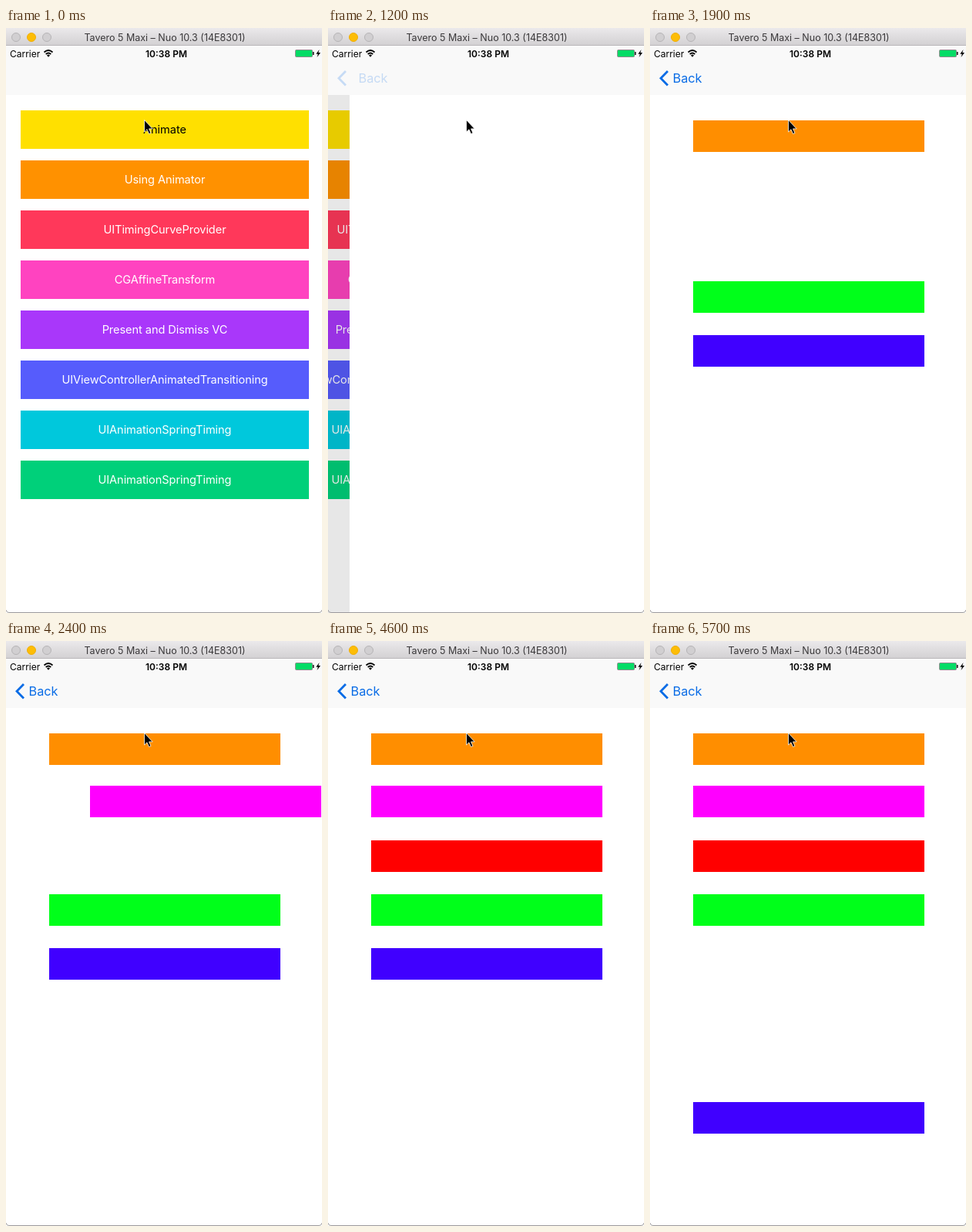
An HTML page that plays this animation: 410 by 760 pixels, repeating every 5800 ms.

```html
<!DOCTYPE html>
<html lang="en">
<head>
<meta charset="utf-8">
<style>
html, body { margin: 0; width: 100%; height: 100%; overflow: hidden; background: #fff; }
svg { display: block; width: 410px; height: 760px; font-family: Inter, Roboto, sans-serif; }
#buttons text { font-size: 14.6px; letter-spacing: -.08px; text-anchor: middle; }
</style>
</head>
<body>
<svg viewBox="0 0 410 760">
  <defs>
    <linearGradient id="chrome" x2="0" y2="1">
      <stop stop-color="#ebe9eb"/><stop offset="1" stop-color="#d2d0d2"/>
    </linearGradient>
  </defs>
  <rect width="410" height="760" fill="#fff"/>
  <g id="menu">
    <g id="buttons"></g>
  </g>
  <rect id="dim" y="87" width="410" height="673"/>
  <g id="page">
    <rect y="87" width="410" height="673" fill="#fff"/>
    <g id="bars"></g>
  </g>

  <rect y="23" width="410" height="64" fill="#f9f9f9"/>
  <path id="chevron" d="M23 56 L14 65.2 L23 74.5" fill="none" stroke="#0a6ce6" stroke-width="2.8"/>
  <text id="back" x="29.5" y="71" font-size="16.3" fill="#0a6ce6">Back</text>

  <text x="5" y="38" font-size="12">Carrier</text>
  <g fill="none" stroke="#000" stroke-width="1.7">
    <path d="M49.5 31.5 Q55 26.5 60.5 31.5"/>
    <path d="M51.7 34 Q55 31 58.3 34"/>
  </g>
  <path d="M53 35.4 Q55 33.8 57 35.4 L55 37.8Z"/>
  <text x="208" y="38" font-size="12" font-weight="600" text-anchor="middle">10:38 PM</text>
  <rect x="375.5" y="28.5" width="22" height="9" rx="1" fill="#fff" stroke="#444" stroke-width=".6"/>
  <rect x="376" y="29" width="21" height="8" fill="#04dc66"/>
  <rect x="398" y="31" width="1.6" height="4" fill="#222"/>
  <path d="M406.5 28 L402.3 33.7 H404.8 L403.6 38 L408 32 H405.3Z"/>

  <rect width="410" height="23" fill="url(#chrome)"/>
  <rect y="22" width="410" height="1" fill="#b9b7b9"/>
  <g fill="#d1cfd1" stroke="#b6b4b6">
    <circle cx="13" cy="12" r="5.5"/>
    <circle cx="33" cy="12" r="5.5" fill="#fdbd06" stroke="#f0ae08"/>
    <circle cx="53" cy="12" r="5.5"/>
  </g>
  <text x="206" y="17" font-size="12.5" fill="#3a383a" text-anchor="middle">Tavero 5 Maxi – Nuo 10.3 (14E8301)</text>
  <path d="M0 756 Q.5 759.5 4 759.5 H406 Q409.5 759.5 410 756" fill="none" stroke="#9c9a9c"/>
  <path d="M179.5 119.5 V135 L183 131.8 L185.5 137.5 L188 136.5 L185.6 130.9 H190.2Z" stroke="#fff" stroke-width=".8"/>
</svg>
<script>
const $ = id => document.getElementById(id);
const LOOP = 5800, STEP = 100;

const buttons = [
  ['Animate', '#ffe000'], ['Using Animator', '#ff9100'],
  ['UITimingCurveProvider', '#ff385a'], ['CGAffineTransform', '#ff43c0'],
  ['Present and Dismiss VC', '#a937fa'], ['UIViewControllerAnimatedTransitioning', '#565cfc'],
  ['UIAnimationSpringTiming', '#00c8dc'], ['UIAnimationSpringTiming', '#00d07a']
];
$('buttons').innerHTML = buttons.map(([label, color], i) =>
  `<rect x="19" y="${107 + 65 * i}" width="374" height="50" fill="${color}"/>
   <text x="206" y="${137.3 + 65 * i}" fill="${i ? '#fff' : '#000'}">${label}</text>`).join('');

const colors = ['#ff8e00', '#ff00ff', '#ff0000', '#00ff1a', '#4000ff'];
const tops = [120, 188, 259, 329, 399];
$('bars').innerHTML = colors.map((c, i) =>
  `<rect x="56" y="${tops[i]}" width="300" height="41" fill="${c}"/>`).join('');
const [orange, magenta, red, green, violet] = $('bars').children;

const ramp = (t, from, to) => Math.min(1, Math.max(0, (t - from) / (to - from)));

// cubic-bezier(.42, 0, .58, 1), solved by bisection
function easeInOut(x) {
  let lo = 0, hi = 1, s;
  for (let i = 0; i < 24; i++) {
    s = (lo + hi) / 2;
    const bx = 1.26 * s * (1 - s) ** 2 + 1.74 * s * s * (1 - s) + s ** 3;
    if (bx < x) lo = s; else hi = s;
  }
  return s * s * (3 - 2 * s);
}

// distance still to go, from 1 to 0, for an underdamped spring
function springRest(sec) {
  if (sec <= 0) return 1;
  const zeta = .64, omega = 7.4, decay = zeta * omega;
  const wd = omega * Math.sqrt(1 - zeta * zeta);
  return Math.exp(-decay * sec) * (Math.cos(wd * sec) + decay / wd * Math.sin(wd * sec));
}

// whole pixels keep the edges sharp
const move = (el, x, y) => el.setAttribute('transform', `translate(${Math.round(x)} ${Math.round(y)})`);

function draw(t) {
  const rest = t < 950 ? 1 : t >= 1500 ? 0 : Math.exp((950 - t) / 93);
  move($('menu'), -123 * (1 - rest), 0);
  move($('page'), 410 * rest, 0);
  $('page').style.display = rest === 1 ? 'none' : '';
  $('dim').setAttribute('opacity', .1 * (1 - rest));

  const fade = ramp(t, 1120, 1500);
  $('chevron').setAttribute('opacity', fade);
  $('back').setAttribute('opacity', fade);
  move($('back'), 150 * rest, 0);

  const enter = 1 - easeInOut(ramp(t, 1360, 1860));
  const drop = 200 * easeInOut(ramp(t, 4800, 5400));
  move(orange, 410 * enter, 0);
  move(green, 0, 735 * enter);
  move(violet, 0, 735 * enter + drop);
  move(magenta, 410 * springRest((t - 2083) / 1000), 0);
  red.setAttribute('opacity', easeInOut(ramp(t, 3400, 4200)));
}

const start = performance.now();
function tick() {
  const t = (performance.now() - start) % LOOP;
  draw(Math.floor(t / STEP) * STEP);
  requestAnimationFrame(tick);
}
tick();
</script>
</body>
</html>
```
